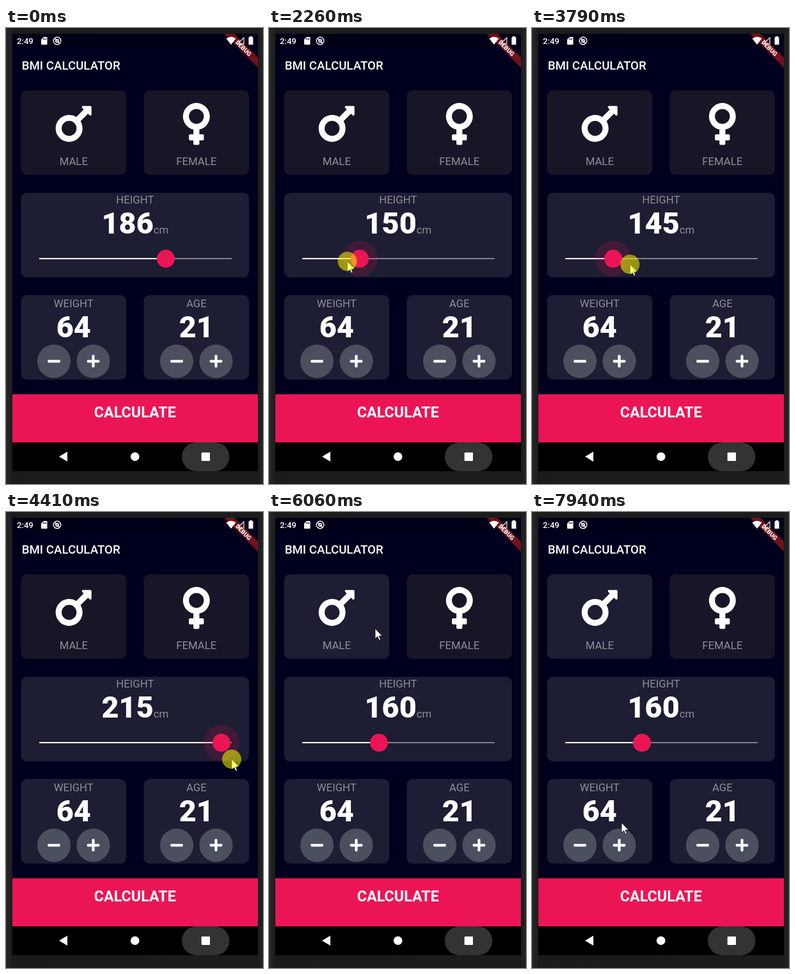
Write an HTML page that moves like this. It is 402 by 712 pixels and loops after 8000 ms.

```html
<!DOCTYPE html>
<html lang="en">
<head>
<meta charset="utf-8">
<title>BMI Calculator</title>
<style>
  html, body { margin: 0; width: 100%; height: 100%; overflow: hidden; background: #1e1e1e; }
  svg { display: block; font-family: Roboto, sans-serif; fill: #fff; }
  .label { font-size: 16.8px; fill: #8d8e98; }
  .number { font-size: 46.7px; font-weight: 900; }
  .mid { text-anchor: middle; }
  .panel { fill: #1d1d33; }
  .off { fill: #181626; }
</style>
</head>
<body>
<svg width="402" height="712" viewBox="0 0 402 712">
  <defs>
    <linearGradient id="bezel">
      <stop offset="0" stop-color="#292929"/>
      <stop offset=".025" stop-color="#1b1b1b"/>
      <stop offset=".98" stop-color="#1c1c1c"/>
      <stop offset="1" stop-color="#252525"/>
    </linearGradient>
    <clipPath id="screen"><path d="M10 9H394V692H10Z"/></clipPath>
    <g id="minus">
      <circle r="26.1" fill="#4c4f5e"/>
      <rect x="-9.8" y="-2.1" width="19.6" height="4.2" rx="1.4"/>
    </g>
    <g id="plus">
      <use href="#minus"/>
      <rect x="-2.1" y="-9.8" width="4.2" height="19.6" rx="1.4"/>
    </g>
  </defs>

  <rect width="402" height="712" fill="url(#bezel)"/>
  <path d="M10 9H394V692H10Z" fill="#00001e"/>
  <path d="M10 9H394V31H10Z" fill="#000" opacity=".2"/>

  <!-- debug ribbon -->
  <g clip-path="url(#screen)">
    <g transform="translate(394 9) rotate(45)">
      <rect x="-38" y="26.1" width="76" height="11.2" fill="#b71c1c" opacity=".63"/>
      <text class="mid" y="35.1" font-size="9.5" font-weight="900">DEBUG</text>
    </g>
  </g>

  <!-- status bar -->
  <text x="17" y="25" font-size="13.1" font-weight="500">2:49</text>
  <path d="M59 14H63.5Q64.5 14 64.5 15V25Q64.5 26 63.5 26H56Q55 26 55 25V18Z"/>
  <path d="M58.5 16V18.5M60.5 16V18.5M62.5 16V18.5" stroke="#00001a"/>
  <g fill="none" stroke="#fff" stroke-width="1.4">
    <circle cx="80" cy="20" r="5.8"/>
    <circle cx="80" cy="20" r="2.4"/>
    <path d="M76.5 16.5L83.5 23.5"/>
    <path d="M372 15V25H362Z" stroke-width="1.1"/>
  </g>
  <path d="M344.5 16.5Q352 11 359.5 16.5L352 26Z"/>
  <path d="M381 14.5V13H385V14.5H386.5V26H379.5V14.5Z"/>

  <text x="24.7" y="64.5" font-size="18.7" font-weight="500">BMI CALCULATOR</text>

  <!-- gender cards -->
  <rect id="male" x="23.5" y="97.3" width="164.6" height="132" rx="9.3"/>
  <rect id="female" x="215.5" y="97.3" width="164.6" height="132" rx="9.3"/>
  <path transform="translate(77.7 112.4) scale(.1458)" d="M372 64h-79c-10.7 0-16 12.9-8.5 20.5l16.9 16.9-80.7 80.7C198.5 167.9 172.2 160 144 160 64.5 160 0 224.5 0 304s64.5 144 144 144 144-64.5 144-144c0-28.2-7.9-54.5-21.7-76.7l80.7-80.7 16.9 16.9c7.6 7.6 20.5 2.2 20.5-8.5V76c0-6.6-5.4-12-12-12zM144 384a80 80 0 1 1 0-160 80 80 0 0 1 0 160z"/>
  <path transform="translate(276.8 112.4) scale(.1458)" d="M288 176A144 144 0 1 0 112 316.4V368H76q-12 0-12 12v40q0 12 12 12h36v36q0 12 12 12h40q12 0 12-12v-36h36q12 0 12-12v-40q0-12-12-12h-36v-51.6A144 144 0 0 0 288 176zM64 176a80 80 0 1 1 160 0 80 80 0 0 1-160 0z"/>
  <text class="label mid" x="105.8" y="214">MALE</text>
  <text class="label mid" x="297.8" y="214">FEMALE</text>

  <!-- height card -->
  <rect class="panel" x="23.5" y="257.3" width="356.6" height="132" rx="9.3"/>
  <text class="label mid" x="201.8" y="274">HEIGHT</text>
  <text class="mid" x="201.9" y="321"><tspan class="number" id="height">186</tspan><tspan class="label">cm</tspan></text>
  <path d="M52 359.2H353V361.1H52Z" fill="#8d8e98"/>
  <rect id="track" x="52" y="359.2" height="1.9"/>
  <g id="thumb" fill="#eb1555">
    <circle id="glow" opacity=".17"/>
    <circle r="14"/>
  </g>

  <!-- weight and age cards -->
  <rect class="panel" x="23.5" y="417" width="164.6" height="132" rx="9.3"/>
  <rect class="panel" x="215.5" y="417" width="164.6" height="132" rx="9.3"/>
  <text class="label mid" x="105.8" y="435.5">WEIGHT</text>
  <text class="label mid" x="297.8" y="435.5">AGE</text>
  <text class="number mid" x="105.8" y="483">64</text>
  <text class="number mid" x="297.8" y="483">21</text>
  <use href="#minus" x="75" y="520.3"/>
  <use href="#plus" x="136.5" y="520.3"/>
  <use href="#minus" x="267" y="520.3"/>
  <use href="#plus" x="328.5" y="520.3"/>

  <path d="M10 572H394V647H10Z" fill="#eb1555"/>
  <text class="mid" x="201.8" y="608" font-size="23.3" font-weight="700">CALCULATE</text>

  <!-- navigation bar -->
  <path d="M10 647H394V692H10Z" fill="#000"/>
  <rect x="275" y="647" width="74.5" height="45" rx="22.5" fill="#333"/>
  <path d="M83 669.3L96 661.5V677Z"/>
  <circle cx="201.7" cy="669.3" r="6.8"/>
  <rect x="305.7" y="662.7" width="13.3" height="13.3" rx="1"/>

  <g id="cursor">
    <path d="M0 0V16L3.8 12.6 6.2 18.3 8.6 17.3 6.2 11.7H11.3Z" stroke="#000" stroke-width=".8"/>
    <circle id="press" r="15" fill="#ff0" opacity=".53"/>
  </g>
</svg>

<script>
const $ = id => document.getElementById(id);
const LOOP = 8000, LAG = 80;
const GRAB = 1780, DROP = 5590;

// Pointer route: time, x, y
const route = [
  [260, 281, 682], [720, 256, 590], [930, 256, 590], [1450, 186, 420],
  [1710, 250, 361], [1790, 247, 361], [1870, 224, 361], [2560, 45, 367],
  [2880, 40, 368], [3180, 18, 370], [3500, 18, 370], [3710, 127, 369],
  [3790, 153, 369], [4330, 337, 384], [4410, 353, 386], [4720, 366, 386],
  [4920, 366, 386], [5350, 172, 379], [5550, 172, 379], [5910, 166, 182],
  [6240, 166, 182], [6600, 262, 186], [6760, 262, 186], [7080, 183, 188],
  [7330, 183, 188], [7940, 140, 485]
];
const presses = [[GRAB, DROP], [5910, 6055], [6650, 6760], [7160, 7240]];

const clamp = (v, lo, hi) => Math.min(hi, Math.max(lo, v));

function pointer(t) {
  t = clamp(t, route[0][0], route.at(-1)[0]);
  const i = Math.max(1, route.findIndex(k => k[0] >= t));
  const [a, b] = [route[i - 1], route[i]];
  const p = (t - a[0]) / (b[0] - a[0]);
  return [a[1] + (b[1] - a[1]) * p, a[2] + (b[2] - a[2]) * p];
}

function draw(t) {
  const [x, y] = pointer(t);
  $('cursor').setAttribute('transform', `translate(${x} ${y})`);
  $('cursor').style.display = t < 260 ? 'none' : '';
  $('press').style.display = presses.some(([a, b]) => t >= a && t < b) ? '' : 'none';

  // The slider trails the pointer slightly and snaps to whole centimetres
  const dragX = pointer(clamp(t - LAG, 1710, DROP - LAG))[0];
  const height = clamp(Math.round((dragX - 52) / 3) + 120, 120, 220);
  const thumbX = 52 + (height - 120) * 3;
  $('height').textContent = height;
  $('track').setAttribute('width', thumbX - 52);
  $('thumb').setAttribute('transform', `translate(${thumbX} 360.3)`);
  const grow = clamp((t - GRAB - 40) / 120, 0, 1) * clamp((DROP + 100 - t) / 100, 0, 1);
  $('glow').setAttribute('r', 28 * grow);

  const female = t >= 6690 && t < 7160;
  $('male').setAttribute('class', t >= 5980 && !female ? 'panel' : 'off');
  $('female').setAttribute('class', female ? 'panel' : 'off');
}

const start = performance.now();
function tick() {
  draw((performance.now() - start) % LOOP);
  requestAnimationFrame(tick);
}
tick();
</script>
</body>
</html>
```
